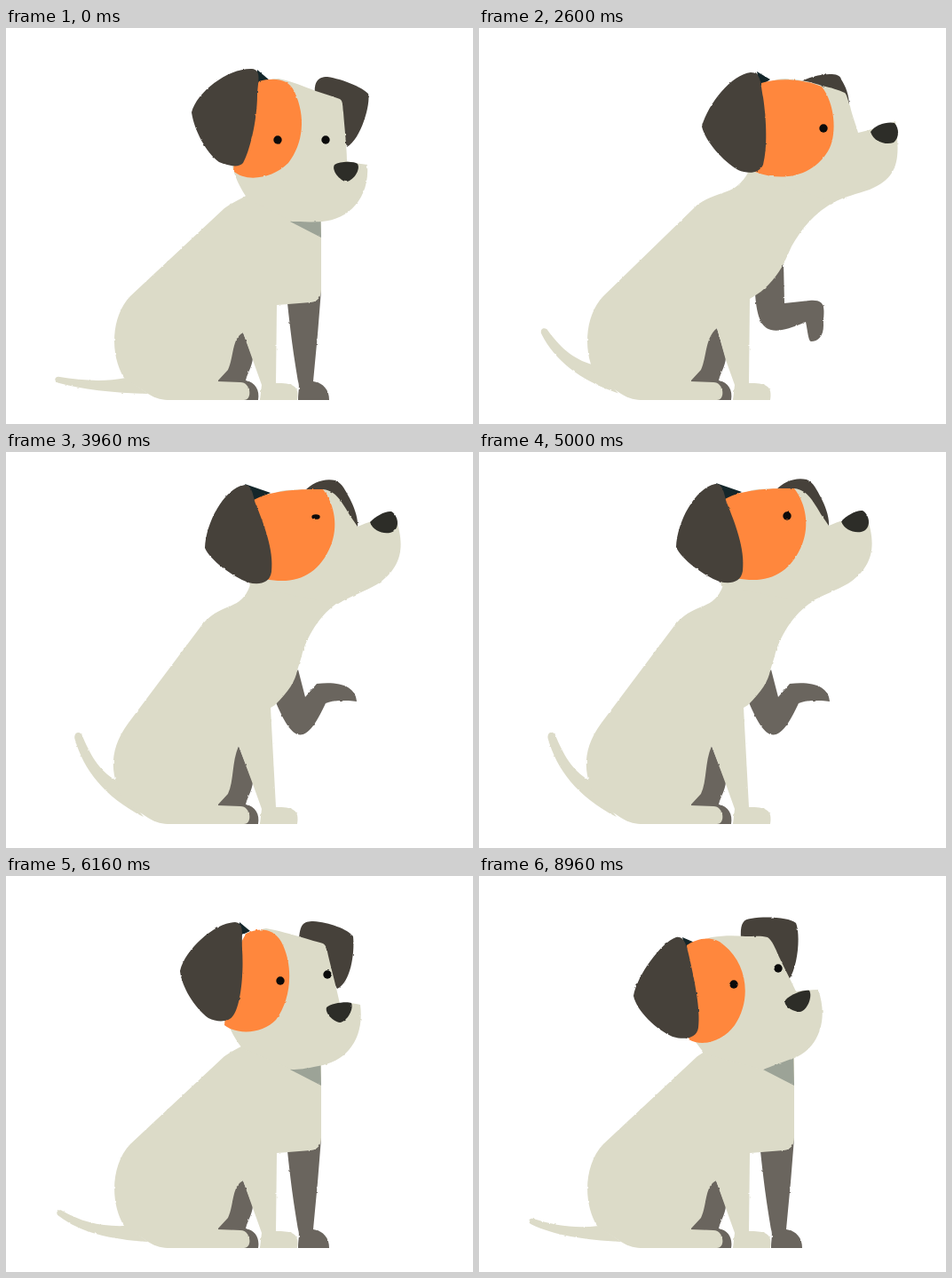
Write an HTML page that moves like this. It is 526 px wide and 446 px high and loops after 9 s.

```html
<!DOCTYPE html>
<html lang="en">
<head>
<meta charset="utf-8">
<title>Sitting dog</title>
<style>
  html, body { margin: 0; width: 100%; height: 100%; overflow: hidden; background: #fff; }
  svg { display: block; width: 100vw; height: 100vh; }
</style>
</head>
<body>
<svg viewBox="0 0 526 446">
  <filter id="rough" x="0" y="0" width="526" height="446" filterUnits="userSpaceOnUse" color-interpolation-filters="sRGB">
    <feTurbulence type="fractalNoise" baseFrequency=".2" numOctaves="2" seed="4" result="grain"/>
    <feDisplacementMap in="SourceGraphic" in2="grain" scale="2" xChannelSelector="R" yChannelSelector="G"/>
  </filter>
  <g filter="url(#rough)">
    <path id="hind" fill="#6a655e"/>
    <path id="leg" fill="#6a655e"/>
    <path id="tail" fill="#dcdbc8"/>
    <path id="body" fill="#dcdbc8"/>
    <path id="shade" fill="#9ca397"/>
    <g id="headGroup">
      <path id="earR" fill="#46413a"/>
      <path id="head" fill="#dcdbc8"/>
      <path id="tuft" fill="#14262a"/>
      <path id="patch" fill="#ff873d"/>
      <path id="earL" fill="#46413a"/>
      <path id="nose" fill="#2d2d28"/>
      <ellipse id="eyeL" fill="#0b0b0b"/>
      <ellipse id="eyeR" fill="#0b0b0b"/>
    </g>
  </g>
</svg>
<script>
const LOOP = 9000, WAG = 600;
const el = id => document.getElementById(id);

const NUMBER = /-?\d+(\.\d+)?/g;
const lerp = (a, b, k) => a + (b - a) * k;
const ease = k => k * k * (3 - 2 * k);

// Blends two strings of the same structure number by number.
const mix = (from, to, k) => {
  if (from === to || k === 0) return from;
  const ends = to.match(NUMBER);
  let i = 0;
  return from.replace(NUMBER, n => lerp(+n, +ends[i++], k).toFixed(2));
};

// Only the back, the gap between the legs and the chest change; the feet stay planted.
const torso = (back, apex, chest) => ({
  body: `M${back} 133,394 L160,412 C170,418 176,419 185,419 L268,419 C278,419 276,399 264,399 L238,398 L250,385
    C257,370 254,350 ${apex} L278,374 L288,402 L286,419 L328,419 C331,402 322,400 304,400 L${chest} Z`,
  hind: `M${apex} L278,372 C277,382 272,388 270,397 C281,399 286,408 284,419 L265,419 L235,398 L250,350 Z`
});

const sitting = {
  ...torso('272,188 C262,194 254,197 246,203 L140,302 C118,325 117,368', '267,343',
    '305,312 L343,309 C352,308 355,302 355,295 L355,240 C355,225 355,215 355,200'),
  leg: 'M355,295 L351,345 L346,398 C358,400 364,408 364,419 C360,419 340,419 329,419 C329,410 331,404 329,398 C327,385 322,360 316,300 Z',
  shade: 'M320,218 L354,200 L355,236 Z',
  tailLow: 'M135,394 C110,399 85,397 59,393 C54,393 54,399 59,400 C85,407 120,411 160,412 Z',
  tailHigh: 'M135,394 C105,393 85,386 64,368 C59,366 56,371 60,374 C82,398 115,408 160,412 Z'
};

const raisedTail = {
  tailLow: 'M126,380 C95,380 75,370 51,346 C46,343 42,348 45,352 C65,385 100,402 155,411 Z',
  tailHigh: 'M124,368 C106,354 99,335 92,312 C88,308 83,311 84,317 C92,352 112,385 155,411 Z'
};

const poses = {
  front: {
    ...sitting,
    head: 'M272,192 C258,172 250,150 254,125 C258,85 280,57 307,57 C322,60 336,66 349,71 C358,74 368,77 376,80 C380,82 379,90 380,95 C381,110 384,135 384,150 C392,152 400,153 407,154 C410,192 385,216 356,218 C340,219 330,218 322,218 Z',
    patch: 'M285,60 C300,56 318,56 325,72 C338,100 335,130 318,152 C300,170 270,174 256,161 L262,100 Z',
    tuft: 'M283,47 L297,59 L282,64 Z',
    earL: 'M209,95 C215,72 250,45 277,46 C288,47 284,60 283,75 C283,105 274,140 267,152 C262,158 250,155 240,151 C225,140 212,115 209,95 Z',
    earR: 'M348,75 C347,62 350,55 362,55 C380,58 400,66 408,74 C411,85 400,125 384,134 L375,100 Z',
    nose: 'M370,154 C376,150 392,150 396,153 C400,160 390,173 383,173 C376,172 366,160 370,154 Z',
    eyes: '306 126 4.7 360 126 4.7'
  },
  tilt: {
    ...sitting,
    head: 'M267,193 C253,174 245,152 249,127 C253,87 275,60 297,58 C310,61 325,66 337,69 C346,72 355,74 361,77 C366,79 367,86 368,91 C371,108 375,125 378,146 C386,145 394,146 401,147 C406,185 385,210 353,215 C338,217 330,218 322,218 Z',
    patch: 'M275,62 C290,57 306,57 315,72 C327,98 325,135 308,158 C293,174 264,177 247,165 L255,100 Z',
    tuft: 'M269,52 L281,62 L268,66 Z',
    earL: 'M200,103 C206,78 240,51 262,51 C272,51 270,62 270,78 C272,108 268,145 259,156 C254,163 240,162 230,157 C215,145 202,122 200,103 Z',
    earR: 'M334,70 C336,55 340,52 350,52 C370,53 388,62 396,70 C398,90 392,122 376,130 L360,95 Z',
    nose: 'M363,149 C368,144 386,144 391,146 C394,152 386,166 378,167 C371,167 361,155 363,149 Z',
    eyes: '303 124 4.7 357 119 4.7'
  },
  glance: {
    ...sitting,
    head: 'M266,194 C251,175 243,153 246,128 C250,88 273,61 293,59 C306,61 322,66 333,69 C342,72 351,74 357,76 C361,78 362,85 363,90 C367,107 372,125 376,144 C384,143 392,143 399,145 C404,184 383,209 352,214 C337,217 330,218 322,218 Z',
    patch: 'M270,65 C285,58 300,58 310,74 C324,100 322,138 304,162 C290,177 262,180 246,168 L252,100 Z',
    tuft: 'M263,52 L275,62 L262,68 Z',
    earL: 'M196,107 C202,82 235,53 258,52 C269,53 265,66 266,82 C268,112 264,146 256,157 C251,165 238,165 228,160 C212,148 198,125 196,107 Z',
    earR: 'M330,72 C331,54 335,51 346,51 C364,52 385,60 391,68 C393,88 388,120 373,127 L355,95 Z',
    nose: 'M361,148 C366,143 384,141 389,143 C392,150 384,164 376,165 C368,164 359,154 361,148 Z',
    eyes: '309 118 4.7 362 111 4.7'
  },
  back: {
    ...sitting,
    tailLow: mix(sitting.tailLow, sitting.tailHigh, 0.28),
    head: 'M255,201 C240,183 228,165 228,140 C228,100 245,72 262,69 C275,67 288,67 300,68 C310,68 318,67 325,69 C330,72 334,82 337,89 C343,102 350,115 357,130 C365,129 374,128 382,128 C395,165 380,197 352,206 C338,211 330,214 320,218 Z',
    patch: 'M234,78 C245,70 264,66 276,78 C303,100 307,140 288,168 C275,186 252,193 236,184 L238,120 Z',
    tuft: 'M229,69 L243,75 L233,84 Z',
    earL: 'M174,135 C178,112 205,75 222,69 C231,67 234,78 237,92 C242,115 250,150 247,171 C245,183 232,185 218,181 C200,173 178,153 174,135 Z',
    earR: 'M295,72 C294,54 297,49 306,48 C325,45 350,47 357,53 C362,65 360,100 349,117 L325,90 Z',
    nose: 'M345,140 C351,133 366,128 372,129 C376,135 370,152 361,153 C354,153 342,146 345,140 Z',
    eyes: '287 122 4.7 337 104 4.7'
  },
  reach: {
    ...torso('303,163 C287,190 275,180 246,199 L140,302 C118,325 117,368', '268,338',
      '305,305 L313,300 C325,293 337,277 343,266 L352,246 C362,228 378,207 402,195'),
    tailLow: mix(sitting.tailLow, raisedTail.tailLow, 0.6),
    tailHigh: mix(sitting.tailHigh, raisedTail.tailHigh, 0.6),
    leg: 'M343,264 L344,310 L372,307 C393,305 388,318 388,335 C388,347 382,353 374,353 C371,353 370,340 368,331 C325,350 314,342 311,299 Z',
    shade: 'M390,190 L390,190 L390,190 Z',
    head: 'M303,165 C300,150 300,130 300,110 C300,80 320,57 345,57 C365,58 378,62 386,65 C396,67 406,70 412,73 C415,76 416,84 418,88 C420,98 425,110 427,118 C440,115 455,110 469,105 C475,150 472,168 440,182 C425,187 412,190 400,196 Z',
    patch: 'M318,62 C335,56 365,57 386,66 C401,85 403,118 395,135 C380,165 345,175 311,162 L318,110 Z',
    tuft: 'M313,49 L328,58 L316,66 Z',
    earL: 'M251,111 C258,85 285,52 306,50 C318,50 317,62 320,78 C324,105 325,135 320,154 C315,165 302,164 292,160 C275,150 255,128 251,111 Z',
    earR: 'M360,62 C368,56 385,52 395,52 C402,52 407,53 408,58 C413,66 417,75 417,88 L400,85 Z',
    nose: 'M441,117 C446,109 460,105 468,107 C474,114 473,124 467,129 C459,132 445,129 441,117 Z',
    eyes: '388 113 4.7 417 106 0'
  },
  up: {
    ...raisedTail,
    ...torso('275,150 C264,180 245,168 222,193 L138,305 C112,340 120,368', '262,331',
      '298,288 L303,285 C318,270 326,258 328,246 L333,230 C338,209 354,182 375,169'),
    leg: 'M329,245 L337,276 L350,261 C376,258 394,264 395,281 C390,280 382,280 376,280 C370,280 365,281 360,283 C338,331 324,330 304,282 Z',
    shade: 'M360,165 L360,165 L360,165 Z',
    head: 'M275,152 C272,135 270,120 272,100 C274,70 290,46 315,43 C330,42 345,42 357,42 C366,43 372,48 377,55 C381,61 385,67 387,71 C390,75 393,80 396,84 C405,80 425,73 438,72 C452,110 443,132 418,149 C405,157 388,162 374,171 Z',
    patch: 'M279,54 C300,42 335,42 357,42 C371,60 374,85 366,105 C352,140 325,150 292,143 L295,100 Z',
    tuft: 'M269,36 L298,46 L279,55 Z',
    earL: 'M224,108 C225,80 245,42 268,37 C277,36 278,48 281,58 C290,80 302,110 299,135 C297,148 285,150 273,147 C255,140 230,122 224,108 Z',
    earR: 'M335,45 C345,34 359,29 371,32 C379,35 383,45 387,52 C392,62 397,74 396,85 L380,75 Z',
    nose: 'M410,79 C416,72 428,66 434,67 C441,71 444,83 437,89 C430,94 414,91 410,79 Z',
    eyes: '349 73 4.7 388 72 0'
  }
};

// time, pose, head offset x, y
const keys = [
  [0, 'front', 0, 0], [1000, 'front', -1, 0], [1290, 'tilt', 0, 0], [2160, 'tilt', -1, 0],
  [2460, 'reach', 16, 3], [2600, 'reach', 0, 0], [2860, 'up', 3, -6], [3080, 'up', 1, 0],
  [3960, 'up', 0, 0], [5000, 'up', -2, -1], [5240, 'up', -2, -1], [5380, 'up', 0, -6],
  [5580, 'reach', 0, 0], [5860, 'glance', 1, 0], [6160, 'glance', 0, 0], [7700, 'glance', 0, 0],
  [8120, 'back', 0, 0], [LOOP, 'back', 0, 0]
];

function setEye(id, x, y, r, open) {
  const eye = el(id);
  eye.setAttribute('cx', x);
  eye.setAttribute('cy', y);
  eye.setAttribute('rx', r);
  eye.setAttribute('ry', r * open);
}

function draw(t) {
  const next = keys.findIndex(key => key[0] > t);
  const [t0, name0, x0, y0] = keys[next - 1];
  const [t1, name1, x1, y1] = keys[next];
  const k = ease((t - t0) / (t1 - t0));
  const part = id => mix(poses[name0][id], poses[name1][id], k);

  for (const id of ['hind', 'leg', 'body', 'shade', 'earR', 'head', 'tuft', 'patch', 'earL', 'nose'])
    el(id).setAttribute('d', part(id));

  const wag = (1 - Math.cos(2 * Math.PI * (t / WAG + 0.033))) / 2;
  el('tail').setAttribute('d', mix(part('tailLow'), part('tailHigh'), wag));
  el('headGroup').setAttribute('transform', `translate(${lerp(x0, x1, k)} ${lerp(y0, y1, k)})`);

  const [lx, ly, lr, rx, ry, rr] = part('eyes').split(' ');
  const open = Math.min(1, 0.1 + Math.abs(t - 3900) / 120);
  setEye('eyeL', lx, ly, lr, open);
  setEye('eyeR', rx, ry, rr, open);
}

const start = performance.now();
function tick() {
  draw((performance.now() - start) % LOOP);
  requestAnimationFrame(tick);
}
tick();
</script>
</body>
</html>
```
